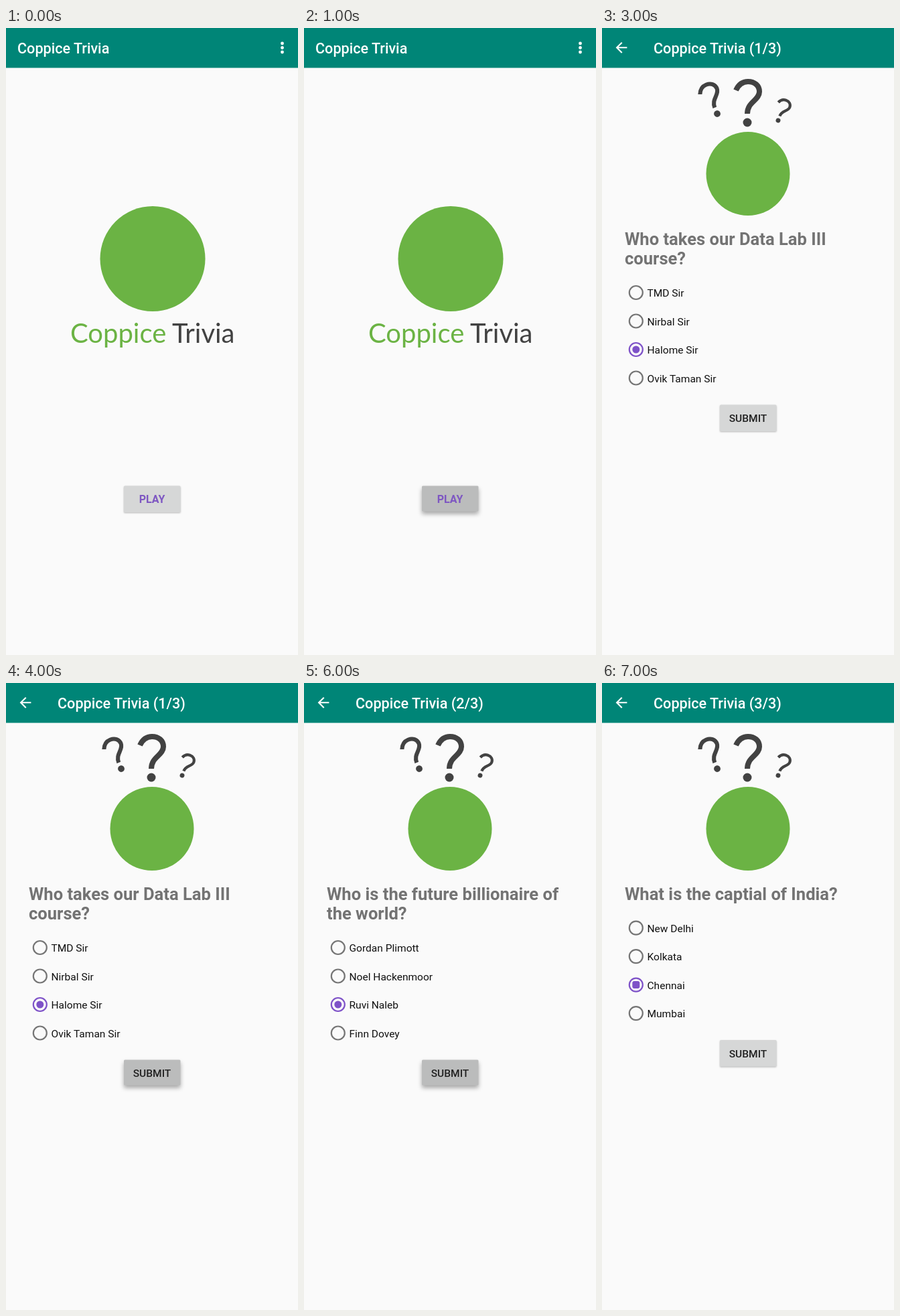
These frames come from a looping animation (436 px wide and 936 px high, 8 s). An HTML page:

```html
<!DOCTYPE html>
<html lang="en">
<head>
<meta charset="utf-8">
<title>Coppice Trivia</title>
<style>
  html, body { margin: 0; width: 100%; height: 100%; overflow: hidden; background: #fafafa; }
  svg { display: block; width: 100%; height: 100%; font-family: Roboto, sans-serif; }
  .scene { visibility: hidden; animation: show 8s step-end infinite; }
  @keyframes show {
    0% { visibility: visible; }
    12.5%, 100% { visibility: hidden; }
  }
  .title { font-size: 21.6px; font-weight: 500; fill: #fff; }
  .brand { font: 40px Lato, sans-serif; }
  .question { font-size: 25.55px; font-weight: 700; fill: #737373; }
  .option { font-size: 15.54px; fill: #111; }
  .button { text-anchor: middle; font-size: 15.54px; font-weight: 500; fill: #222; }
  .play { font-size: 16px; font-weight: 700; fill: #7e57c2; }
  .face { fill: #d6d7d7; filter: drop-shadow(0 1px 1px rgba(0, 0, 0, .27)); }
  .pressed { fill: #bbbcbc; filter: drop-shadow(0 4px 3px rgba(0, 0, 0, .33)); }
  .ring { fill: none; stroke: #757575; stroke-width: 2.2; }
  .on { stroke: #7e52c8; }
  .dot { fill: #7e52c8; }
</style>
</head>
<body>
<svg id="stage" viewBox="0 0 436 936" preserveAspectRatio="none">
  <defs>
    <g id="mark">
      <path d="M-17-48C-13-57-7-61 1-61C11-61 18-55 18-46C18-33 0-31 0-13" fill="none" stroke="#424242" stroke-width="8"/>
      <circle r="6.5" fill="#424242"/>
    </g>
    <g id="art">
      <use href="#mark" transform="translate(172 128) rotate(-22) scale(.76)"/>
      <use href="#mark" transform="translate(217 141)"/>
      <use href="#mark" transform="translate(263 138) rotate(20) scale(.53)"/>
      <circle cx="218" cy="217.5" r="62.5" fill="#6bb344"/>
    </g>
    <path id="back" fill="#fff" transform="translate(16.4 16.7) scale(1.05)"
      d="M20 11H7.83l5.59-5.59L12 4l-8 8 8 8 1.41-1.41L7.83 13H20z"/>
    <g id="menu" fill="#fff">
      <circle cx="412.5" cy="23" r="2.4"/><circle cx="412.5" cy="29.5" r="2.4"/><circle cx="412.5" cy="36" r="2.4"/>
    </g>
  </defs>
  <rect width="436" height="936" fill="#fafafa"/>
  <rect width="436" height="59.5" fill="#008577"/>
</svg>
<script>
  const app = 'Coppice Trivia';
  const quiz = [
    { lines: ['Who takes our Data Lab III', 'course?'],
      options: ['TMD Sir', 'Nirbal Sir', 'Halome Sir', 'Ovik Taman Sir'] },
    { lines: ['Who is the future billionaire of', 'the world?'],
      options: ['Gordan Plimott', 'Noel Hackenmoor', 'Ruvi Naleb', 'Finn Dovey'] },
    { lines: ['What is the captial of India?'],
      options: ['New Delhi', 'Kolkata', 'Chennai', 'Mumbai'] }
  ];

  const text = (x, y, cls, str) => `<text x="${x}" y="${y}" class="${cls}">${str}</text>`;

  const button = (y, label, pressed, cls = '') =>
    `<rect x="176" y="${y}" width="84.5" height="${pressed ? 38 : 39.5}" rx="1.5" class="face ${pressed ? 'pressed' : ''}"/>` +
    text(218, y + 25.5, 'button ' + cls, label);

  const radio = (y, label, on, corner) =>
    `<circle cx="50.8" cy="${y}" r="10" class="ring ${on ? 'on' : ''}"/>` +
    (on ? `<rect x="45.3" y="${y - 5.5}" width="11" height="11" rx="${corner}" class="dot"/>` : '') +
    text(67.5, y + 6, 'option', label);

  const home = pressed =>
    text(17, 37.7, 'title', app) + '<use href="#menu"/>' +
    '<circle cx="219" cy="344.5" r="78.5" fill="#6bb344"/>' +
    '<g class="brand"><text x="96" y="469.5" fill="#6bb344">Coppice</text>' +
    '<text x="248" y="469.5" fill="#424242">Trivia</text></g>' +
    button(683.5, 'PLAY', pressed, 'play');

  const ask = (n, chosen, pressed, corner = 5.5) => {
    const { lines, options } = quiz[n];
    const top = 336.2 + lines.length * 29.4;
    return '<use href="#back"/><use href="#art"/>' +
      text(77, 37.7, 'title', `${app} (${n + 1}/3)`) +
      lines.map((line, i) => text(34, 324 + i * 29.4, 'question', line)).join('') +
      options.map((name, i) => radio(top + i * 42.5, name, i === chosen, corner)).join('') +
      button(top + 167.4, 'SUBMIT', pressed);
  };

  // One scene per second
  const scenes = [
    home(false), home(true),
    ask(0, 0, false), ask(0, 2, false), ask(0, 2, true),
    ask(1, 2, false, 3), ask(1, 2, true),
    ask(2, 2, false, 3)
  ];
  document.getElementById('stage').insertAdjacentHTML('beforeend', scenes.map((scene, i) =>
    `<g class="scene" style="animation-delay:${i - scenes.length}s">${scene}</g>`).join(''));
</script>
</body>
</html>
```
